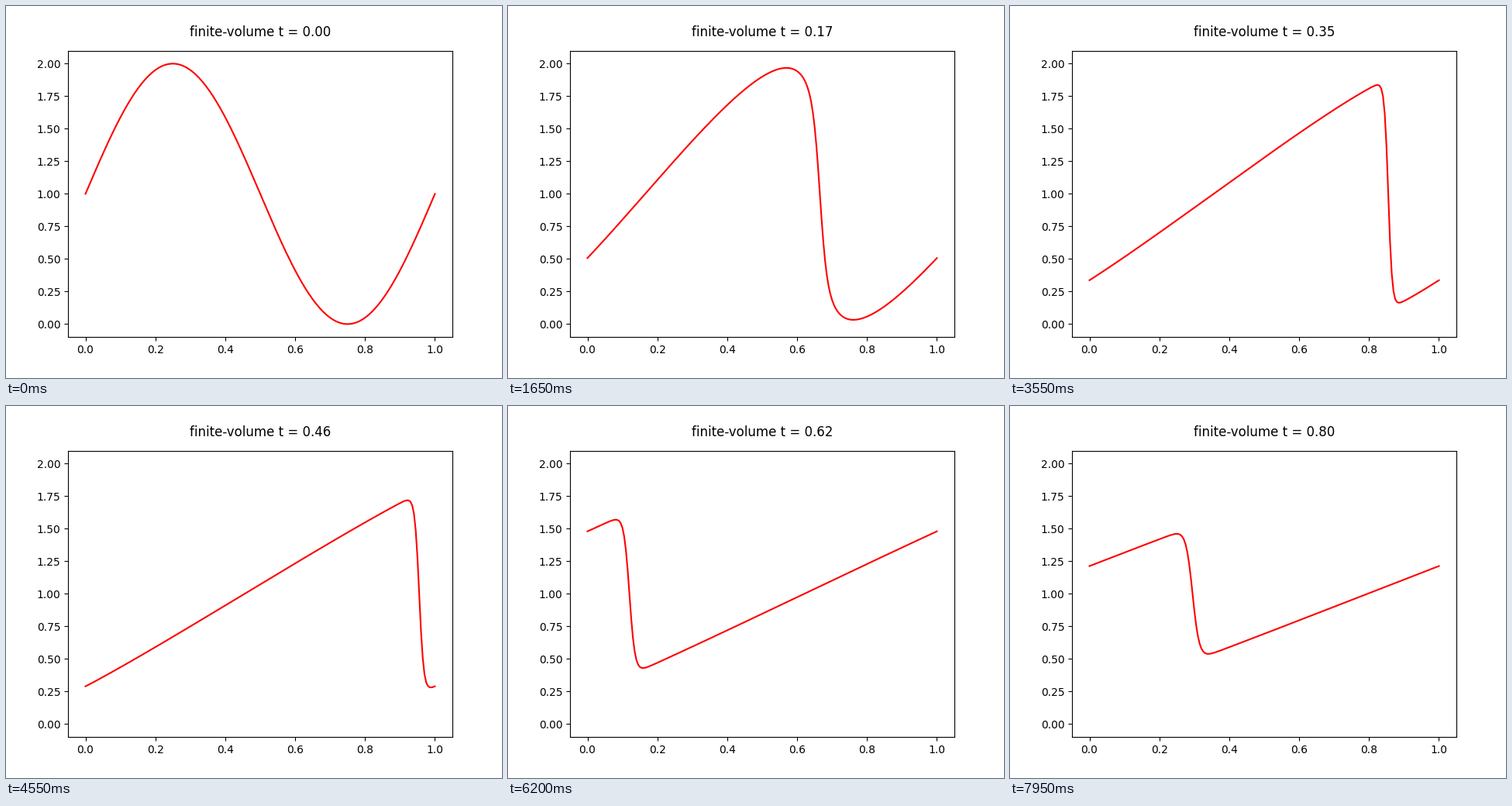
Animation, 640 px wide and 480 px high, one loop 8000 ms. Source, as a matplotlib script:

```python
import numpy as np
import matplotlib.pyplot as plt
from matplotlib.animation import FuncAnimation

FRAMES = 160
INTERVAL = 50          # ms
DT = 0.005             # simulated time per frame
NU = 0.005             # viscosity
K = 2 * np.pi

x = np.linspace(0, 1, 201)
shift = np.linspace(-1.1, 1.1, 881)


def burgers(t):
    """Viscous Burgers solution for u(x, 0) = 1 + sin(2 pi x), by Cole-Hopf."""
    xi = x - t
    if t == 0:
        return 1 + np.sin(K * xi)
    start = xi[:, None] - shift
    action = shift**2 / (2 * t) + (1 - np.cos(K * start)) / K
    action -= action.min(axis=1, keepdims=True)
    weight = np.exp(-action / (2 * NU))
    return 1 + weight @ shift / (t * weight.sum(axis=1))


fig, ax = plt.subplots(figsize=(6.4, 4.8), dpi=100)
ax.set_xlim(-0.05, 1.05)
ax.set_ylim(-0.1, 2.1)
line, = ax.plot(x, burgers(0), color="red", lw=1.5)
label = ax.text(0.5, 1.05, "", transform=ax.transAxes, ha="center", fontsize=12)


def update(n):
    t = n * DT
    line.set_ydata(burgers(t))
    label.set_text(f"finite-volume t = {t:.2f}")
    return line, label


anim = FuncAnimation(fig, update, frames=FRAMES, interval=INTERVAL,
                     repeat=True, repeat_delay=0)
plt.show()
```
